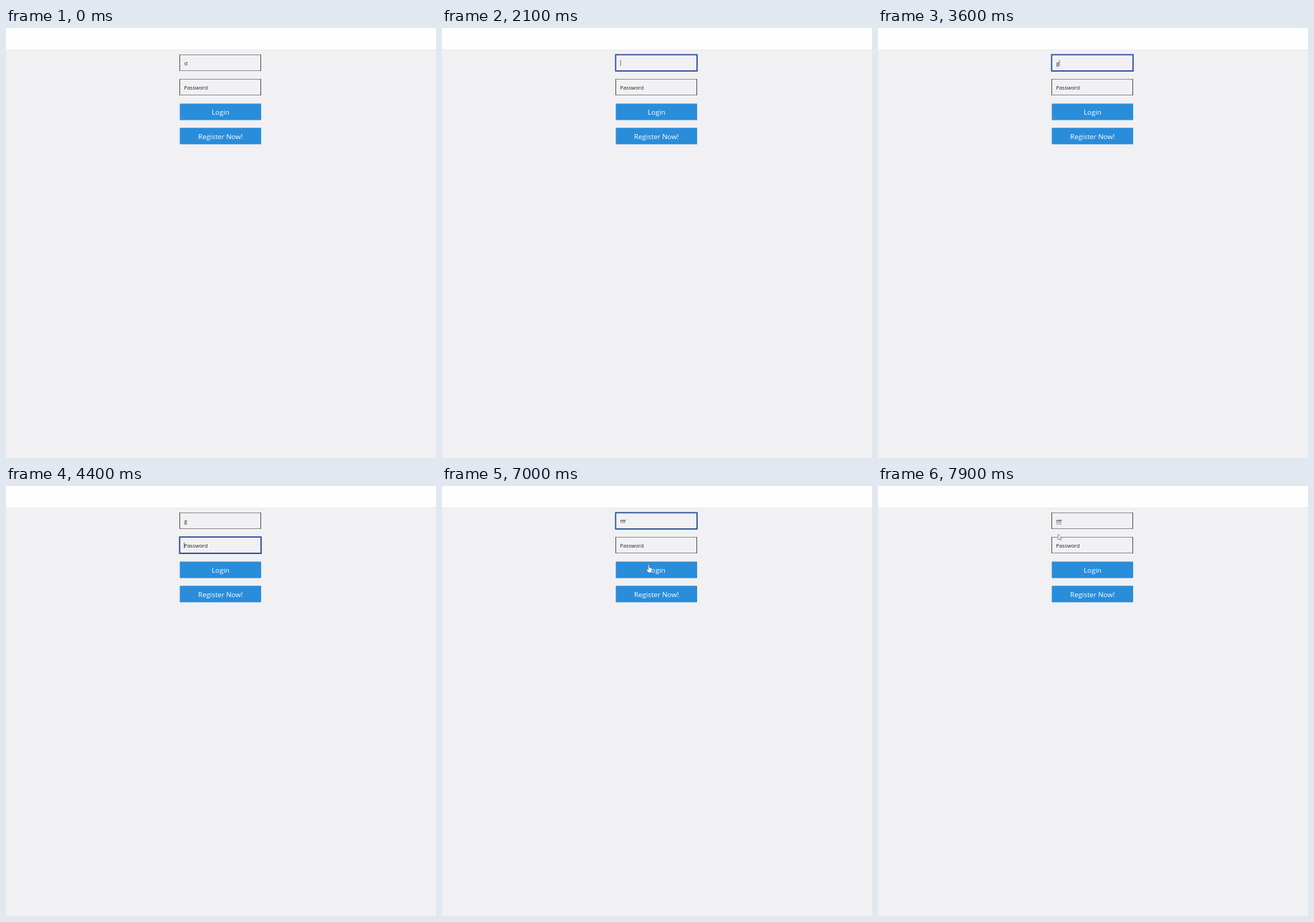
An HTML page that plays this animation: 600 px wide and 600 px high, repeating every 8 s.

```html
<!DOCTYPE html>
<html lang="en">
<head>
<meta charset="utf-8">
<title>Login form</title>
<style>
  html, body { margin: 0; width: 100%; height: 100%; overflow: hidden; background: #f1f0f3; }
  svg { display: block; width: 100%; height: 100%; font-family: "Open Sans", "Noto Sans", sans-serif; }
  .field text { font-size: 7.3px; fill: #222; }
  .button text { font-size: 9.7px; fill: #fff; text-anchor: middle; }
  .button rect { fill: #2a8dda; }
  .side { stroke: #55555a; }
  .edge { stroke: #929297; }
  .ring { fill: none; stroke-width: 1.7; }
  .caret { stroke: #333; stroke-width: .6; }
  [hidden] { display: none; }
</style>
</head>
<body>
<svg viewBox="0 0 600 600">
  <rect width="600" height="600" fill="#f1f0f3"/>
  <rect width="600" height="30" fill="#fefefe"/>
  <path d="M0 30.5H600" stroke="#ebeaed"/>

  <g class="field" id="user">
    <path class="edge" d="M242 37.5H356M242 59.5H356"/>
    <path class="side" d="M242.5 37V60M355.5 37V60"/>
    <rect class="ring" x="242.3" y="37.3" width="113.6" height="22.7" stroke="#28509f"/>
    <text x="248.8" y="51.6"></text>
    <path id="squiggle" d="M249 53.3H256.5" stroke="#666" stroke-width=".8" stroke-dasharray="1 .6"/>
    <path class="caret" d="M0 44.5V53"/>
  </g>

  <g class="field" id="pass">
    <path class="edge" d="M242 71.5H356M242 93.5H356"/>
    <path class="side" d="M242.5 71V94M355.5 71V94"/>
    <rect class="ring" x="242.3" y="71.2" width="113.6" height="22.8" stroke="#2c429f"/>
    <text x="248.6" y="85.7">Password</text>
    <path class="caret" d="M248.7 78.5V87"/>
  </g>

  <g class="button">
    <rect x="242.5" y="105.5" width="113.5" height="23" rx=".6"/>
    <text x="299.4" y="121.3">Login</text>
  </g>
  <g class="button">
    <rect x="242.5" y="139.3" width="113.5" height="23" rx=".6"/>
    <text x="299.2" y="155">Register Now!</text>
  </g>

  <g id="pointer">
    <path id="arrow" d="M0 0V8L1.9 6.4L3.2 9L4.4 8.4L3.2 5.9H5.4Z"
      fill="#fbfbfc" stroke="#77777b" stroke-width=".7"/>
    <path id="beam" d="M-1.6 -4H1.6M0 -4V4M-1.6 4H1.6" fill="none" stroke="#77777b" stroke-width=".7"/>
    <path id="hand" d="M-.8 0Q0 -1 .8 0V3.6L4 4.5Q4.8 5 4.4 7.6L3.6 11H-.8L-3 7.3Q-3.2 6 -2.2 6L-.8 7Z"
      fill="#fff" stroke="#345a80" stroke-width=".6"/>
  </g>
</svg>
<script>
  const LOOP = 8000, STEP = 100;
  const $ = selector => document.querySelector(selector);
  const show = (node, on) => node.toggleAttribute("hidden", !on);

  // Hard changes: [start time, value]
  const typed = [[0, "d"], [2000, ""], [2200, "g"], [4800, ""], [5000, "f"],
                 [6400, "ff"], [6500, "fff"]];
  const focus = [[0, ""], [1700, "user"], [2700, "pass"], [3600, "user"],
                 [4100, "pass"], [6300, "user"], [7300, ""]];

  // Pointer strokes: [start, end, from, to, time at which it disappears]
  const strokes = [
    [800, 1600, [5, 200], [279, 53], 2000],
    [5700, 6000, [290, 86], [275.8, 50], 6400],
    [6700, 7000, [277, 54], [288.5, 110], 7200],
    [7200, 7900, [288.5, 110], [251.2, 67], LOOP]
  ];

  const valueAt = (track, t) => track.filter(([start]) => start <= t).pop()[1];

  function pointerAt(t) {
    const stroke = strokes.find(([start, , , , gone]) => t >= start && t < gone);
    if (!stroke) return null;
    const [start, end, from, to] = stroke;
    const k = Math.min(1, (t - start) / (end - start));
    return from.map((v, i) => v + (to[i] - v) * k);
  }

  function pointerShape([x, y]) {
    const within = (top, bottom) => x > 242 && x < 356 && y > top && y < bottom;
    if (within(37, 60) || within(71, 94)) return "beam";
    if (within(105, 128) || within(139, 162)) return "hand";
    return "arrow";
  }

  function draw(t) {
    const active = valueAt(focus, t);
    const label = $("#user text");
    const value = valueAt(typed, t);
    if (label.textContent !== value) label.textContent = value;

    for (const id of ["user", "pass"]) {
      show($(`#${id} .ring`), active === id);
      show($(`#${id} .caret`), active === id && (id === "pass" || t < 6700));
    }
    const caretX = 249.2 + label.getComputedTextLength();
    $("#user .caret").setAttribute("transform", `translate(${caretX} 0)`);
    show($("#squiggle"), t >= 7400);

    const point = pointerAt(t);
    show($("#pointer"), point);
    if (!point) return;
    $("#pointer").setAttribute("transform", `translate(${point})`);
    const shape = pointerShape(point);
    for (const id of ["arrow", "beam", "hand"]) show($("#" + id), id === shape);
  }

  const origin = performance.now();
  function tick() {
    const t = (performance.now() - origin) % LOOP;
    draw(Math.floor(t / STEP) * STEP);
    requestAnimationFrame(tick);
  }
  tick();
</script>
</body>
</html>
```
